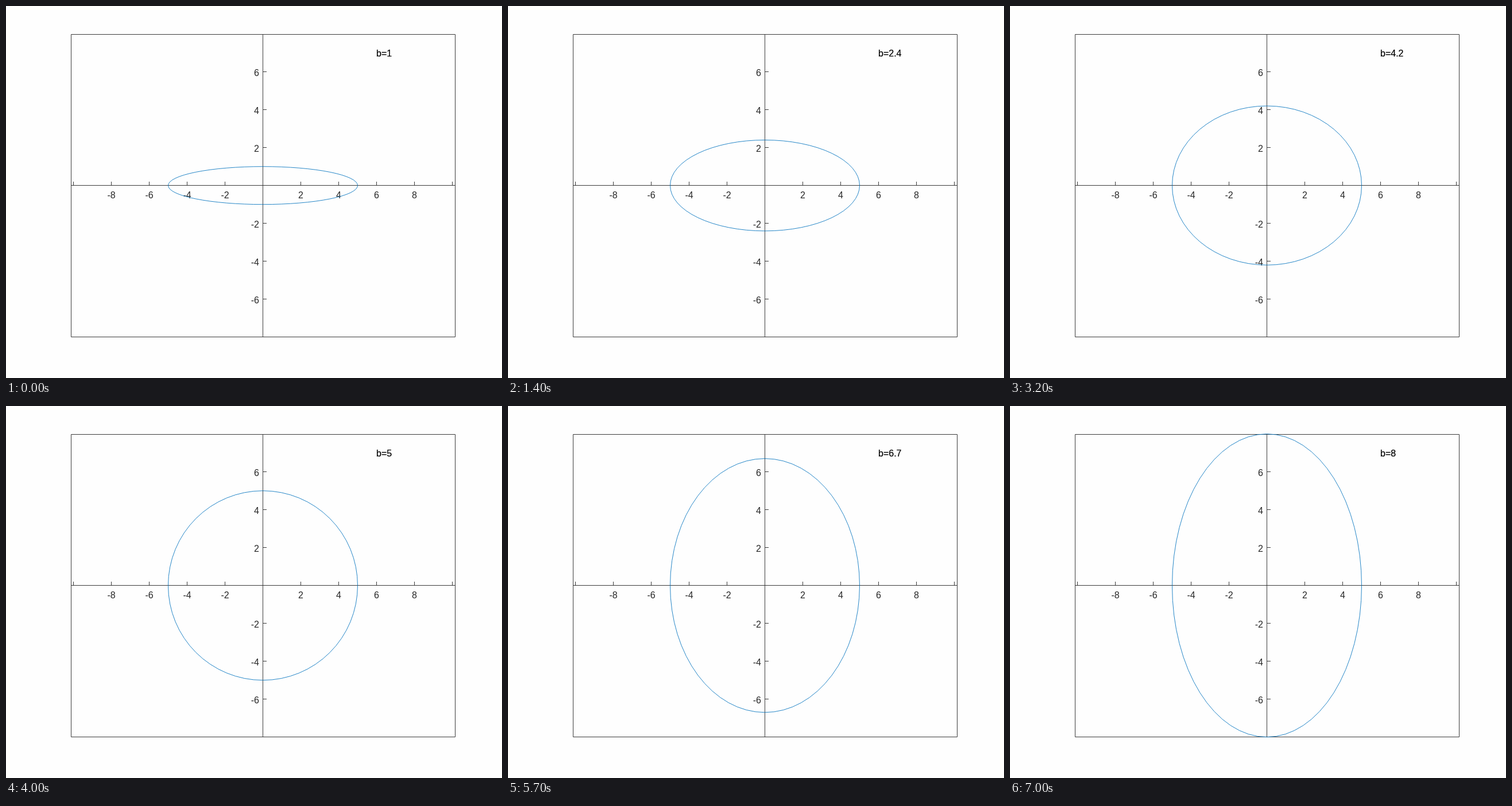
Animation of 864 by 648 pixels, one loop 7.1 s. Source, as an HTML page:

```html
<!DOCTYPE html>
<html lang="en">
<head>
<meta charset="utf-8">
<title>Ellipse with growing b</title>
<style>
  html, body { margin: 0; width: 100%; height: 100%; overflow: hidden; background: #fefefe; }
  svg { display: block; width: 100vw; height: 100vh; }
  text { font: 16px "Liberation Sans", Arial, sans-serif; font-kerning: none; fill: #262626; }
  #axes { fill: none; stroke: #262626; stroke-width: 0.9; }
  #curve { fill: none; stroke: #0072bd; stroke-width: 0.85; }
  #value { fill: #000; stroke: #000; stroke-width: 0.2; }
</style>
</head>
<body>
<svg viewBox="0 0 864 648">
  <path id="axes"/>
  <g id="labels"></g>
  <ellipse id="curve"/>
  <text id="value" x="645" y="88"></text>
</svg>
<script>
const STEP = 100, STEPS = 71;
const CX = 447.5, CY = 312.66, UNIT = 33;
const LEFT = 113.5, TOP = 49.5, RIGHT = 782.5, BOTTOM = 576.5;
const $ = id => document.getElementById(id);
const crisp = v => Math.floor(v) + 0.5;
const px = x => CX + x * UNIT;
const py = y => CY - y * UNIT;

function setAttrs(node, attrs) {
  for (const name in attrs) node.setAttribute(name, attrs[name]);
}

function addLabel(text, x, y, anchor) {
  const label = document.createElementNS("http://www.w3.org/2000/svg", "text");
  setAttrs(label, { x, y, "text-anchor": anchor });
  label.textContent = text;
  $("labels").append(label);
}

function drawAxes() {
  const x0 = crisp(CX), y0 = crisp(CY);
  let d = `M${LEFT} ${TOP}H${RIGHT}V${BOTTOM}H${LEFT}Z`;
  d += `M${LEFT} ${y0}H${RIGHT}M${x0} ${TOP}V${BOTTOM}`;
  for (let n = -10; n <= 10; n += 2) {
    if (n === 0) continue;
    d += `M${crisp(px(n))} ${y0}V306`;
    if (Math.abs(n) < 10) addLabel(n, px(n), 335, "middle");
    if (Math.abs(n) < 8) {
      d += `M${x0} ${crisp(py(n))}H454`;
      addLabel(n, 441, py(n) + 6.9, "end");
    }
  }
  $("axes").setAttribute("d", d);
}

function draw(time) {
  const step = Math.floor(time / STEP) % STEPS;
  const b = (10 + step) / 10;
  $("curve").setAttribute("ry", b * UNIT);
  $("value").textContent = "b=" + b;
}

drawAxes();
setAttrs($("curve"), { cx: CX, cy: CY, rx: 5 * UNIT });

const start = performance.now();
function tick() {
  draw(performance.now() - start);
  requestAnimationFrame(tick);
}
tick();
</script>
</body>
</html>
```
